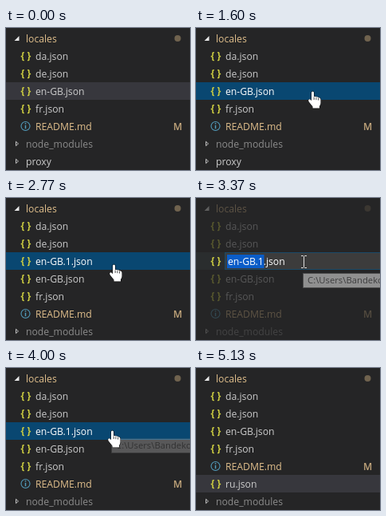
Write an HTML page that moves like this. It is 231 px wide and 178 px high and loops after 5610 ms.

```html
<!DOCTYPE html>
<html lang="en">
<head>
<meta charset="utf-8">
<title>Duplicate and rename a file</title>
<style>
  html, body { margin: 0; width: 100%; height: 100%; overflow: hidden; background: #252526; }
  svg { display: block; width: 100vw; height: 100vh; }
  text { font: 500 12.2px "Open Sans", "Noto Sans", sans-serif; fill: #ccc; white-space: pre; }
  .brace { font-weight: 700; fill: #cbcb41; }
  .changed { fill: #e2c08d; }
  .ignored { fill: #8c8c8c; }
  .badge { font-weight: 600; opacity: .85; }
  .tip text { font-size: 11.3px; font-weight: 400; fill: #575757; }
  #editor text { fill: #fff; }
</style>
</head>
<body>
<svg id="stage" viewBox="0 0 231 178">
  <rect id="hover" width="231" height="22" fill="#2a2d2e"/>
  <rect id="selection" width="231" height="22" fill="#37373d"/>
  <g id="rows"></g>
  <g id="copy"></g>
  <g id="editor">
    <rect x="36.5" y="68.5" width="200" height="21" fill="#3c3c3c" stroke="#1b4a68"/>
    <g id="edit0">
      <rect x="39" y="71" width="46.5" height="17" fill="#0a5dc8"/>
      <text x="40" y="84">en-GB.1.json</text>
    </g>
    <text id="edit1" x="40" y="84">r.json</text>
    <text id="edit2" x="40" y="84">ru.json</text>
  </g>
  <g id="tips"></g>
  <path id="beam" fill="none" stroke="#ddd"
        d="M132 72.5h2.5l1 1 1-1h2.5M135.5 73.5v13M132 87.5h2.5l1-1 1 1h2.5"/>
  <g id="hand" stroke="#000" stroke-linejoin="round">
    <path fill="#fff" paint-order="stroke" d="M4 2Q4 .4 5.5 .4T7 2V7Q8.6 6.2 9.8 7.6Q11.4 6.8 12.5 8.4Q15.5 7.8 15.5 10.8V15Q15.5 17.5 14 19V21.6H5.5V19.5L.7 13.5Q-.6 11.6 .8 10.5Q2.4 9.8 4 12.2Z"/>
    <path fill="none" stroke-width=".7" d="M7.2 7.5v3.5M9.9 8.2v3M12.6 9v2.6"/>
  </g>
</svg>
<script>
const LOOP = 5610;
const ENTER = 1000, SELECT = 1530, PASTE = 2200, FOCUS = 2330;
const EDIT = 3330, COMMIT = 3930, RENAME = 4200, LEAVE = 5130;
const $ = id => document.getElementById(id);

// Keys are [ms, value]; values hold unless the easing says otherwise.
function track(el, prop, keys, easing = 'step-end') {
  const frames = keys.map(([ms, value]) => ({ offset: ms / LOOP, [prop]: value, easing }));
  frames.push({ ...frames[frames.length - 1], offset: 1 });
  el.animate(frames, { duration: LOOP, iterations: Infinity });
}

const at = (x, y) => `translate(${x}px, ${y}px)`;
const atRow = n => at(0, 2 + 22 * n);
const placeRow = (el, keys) => track(el, 'transform', keys.map(([ms, n]) => [ms, atRow(n)]));
const show = (el, from, to = LOOP) => track(el, 'opacity', [[0, 0], [from, 1], ...(to < LOOP ? [[to, 0]] : [])]);

function addGroup(parent, markup) {
  const group = document.createElementNS('http://www.w3.org/2000/svg', 'g');
  group.innerHTML = markup;
  parent.append(group);
  return group;
}

const icons = {
  json: '<text class="brace" x="18.5" y="15">{</text><text class="brace" x="26.5" y="15">}</text>',
  info: '<circle cx="24.5" cy="11" r="5.5" fill="none" stroke="#519aba" stroke-width="1.1"/>' +
        '<path d="M24.5 7v1.5M24.5 9.7v4.6" stroke="#519aba" stroke-width="1.5"/>',
  open: '<path d="M16.5 8v6h-6z" fill="#e8e8e8"/>',
  closed: '<path d="M12.5 8.3l3 2.7-3 2.7z" fill="none" stroke="#c0c0c0"/>'
};

function addRow(parent, icon, name, kind = '', extra = '') {
  const x = icon === 'json' || icon === 'info' ? 37 : 25;
  return addGroup(parent, `${icons[icon]}<text class="label ${kind}" x="${x}" y="16">${name}</text>${extra}`);
}

const list = $('rows');
placeRow(addRow(list, 'open', 'locales', 'changed',
  '<circle cx="215.5" cy="11" r="4" fill="#e2c08d" opacity=".4"/>'), [[0, 0]]);
placeRow(addRow(list, 'json', 'da.json'), [[0, 1]]);
placeRow(addRow(list, 'json', 'de.json'), [[0, 2]]);
const base = addRow(list, 'json', 'en-GB.json');
const shifted = [
  base,
  addRow(list, 'json', 'fr.json'),
  addRow(list, 'info', 'README.md', 'changed', '<text class="changed badge" x="210" y="16">M</text>')
];
shifted.forEach((row, i) => placeRow(row, [[0, 3 + i], [PASTE, 4 + i], [RENAME, 3 + i]]));
placeRow(addRow(list, 'closed', 'node_modules', 'ignored'), [[0, 6], [PASTE, 7]]);
placeRow(addRow(list, 'closed', 'proxy'), [[0, 7], [PASTE, 8]]);
const renamed = addRow(list, 'json', 'ru.json');
placeRow(renamed, [[0, 6]]);
show(renamed, RENAME);

const copy = addRow($('copy'), 'json', 'en-GB.1.json');
placeRow(copy, [[0, 3]]);
show(copy, PASTE, RENAME);

const labelOf = row => row.querySelector('.label');
track(labelOf(base), 'fill', [[0, '#ccc'], [SELECT, '#fff'], [FOCUS, '#ccc']]);
track(labelOf(copy), 'fill', [[0, '#ccc'], [FOCUS, '#fff']]);
track(labelOf(copy), 'opacity', [[0, 1], [EDIT, 0], [COMMIT, 1]]);

track(list, 'opacity', [[0, 1], [EDIT, .3], [COMMIT, 1]]);
placeRow($('selection'), [[0, 3], [PASTE, 4], [FOCUS, 3], [RENAME, 6]]);
track($('selection'), 'fill', [[0, '#37373d'], [SELECT, '#094771'], [RENAME, '#37373d']]);
track($('selection'), 'opacity', [[0, 1], [EDIT, 0], [COMMIT, 1]]);

// Row 9 lies below the stage.
placeRow($('hover'), [[0, 9], [ENTER, 6], [1060, 5], [1130, 4], [1230, 3], [4730, 4], [4830, 5],
  [4930, 6], [5030, 7], [LEAVE, 9]]);

show($('editor'), EDIT, COMMIT);
show($('edit0'), EDIT, 3670);
show($('edit1'), 3670, 3800);
show($('edit2'), 3800, COMMIT);
show($('beam'), EDIT, COMMIT);

function addTip(x, y, keys) {
  const tip = addGroup($('tips'),
    `<rect x="${x + .5}" y="${y + .5}" width="120" height="18" fill="#fff" stroke="#767676"/>
     <text x="${x + 6}" y="${y + 13}">C:\\Users\\Bandeko</text>`);
  tip.setAttribute('class', 'tip');
  track(tip, 'opacity', keys, 'linear');
}
addTip(134, 94, [[0, 0], [3100, 0], [3230, 1], [3290, 1], [3450, 0]]);
addTip(132, 88, [[0, 0], [3970, 0], [4100, 1], [4110, 1], [4200, 0]]);

track($('hand'), 'transform', [
  [0, at(222, 133)], [ENTER, at(222, 133)], [1130, at(178, 102)], [1230, at(153, 84)], [1330, at(141, 78)],
  [1470, at(141, 78)], [1600, at(141, 79)], [2470, at(141, 79)], [2600, at(138, 90)], [2770, at(130, 83)],
  [EDIT, at(130, 83)], [COMMIT, at(128, 78)], [4500, at(128, 78)], [4530, at(127, 81)], [4600, at(127, 81)],
  [4730, at(115, 91)], [4830, at(96, 112)], [4930, at(70, 135)], [5030, at(44, 162)], [5070, at(36, 172)]
], 'linear');
track($('hand'), 'opacity', [[0, 0], [ENTER, 1], [EDIT, 0], [COMMIT, 1], [LEAVE, 0]]);
</script>
</body>
</html>
```
